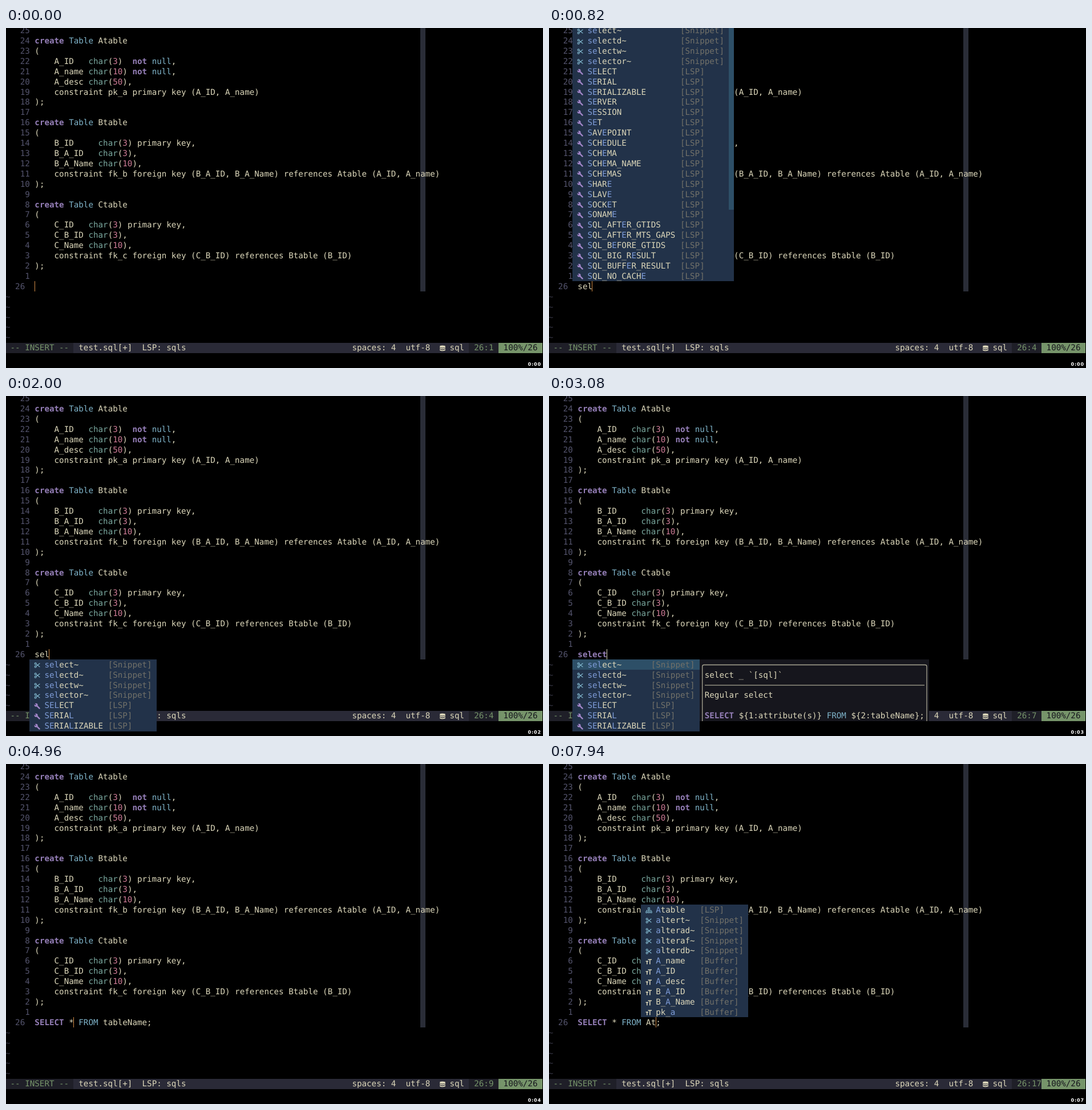
Recreate the animation shown at these times as an HTML page. Size 941 by 595 pixels, loop 8000 ms.

```html
<!DOCTYPE html>
<html lang="en">
<head>
<meta charset="utf-8">
<title>SQL completion in a terminal editor</title>
<style>
  html, body { margin: 0; width: 100%; height: 100%; overflow: hidden; background: #000; }
  #stage {
    position: relative; width: 941px; height: 595px; overflow: hidden;
    font: 14.21px/17.91px "DejaVu Sans Mono", "Liberation Mono", monospace;
    color: #dcd7ba; text-rendering: geometricPrecision; font-variant-ligatures: none;
  }
  #stage i, #stage svg { position: absolute; font-style: normal; white-space: pre; }
  .kw { color: #957fb8; font-weight: bold; }
  .sp { color: #7fb4ca; }
  .ty { color: #7aa89f; }
  .nu { color: #d27e99; }
  .ln { color: #54546d; }
  .tilde { color: #363646; }
  .hit { color: #7e9cd8; }
  .kind { color: #727169; }
  .ins { color: #76946a; }
  .vis { color: #957fb8; }
  .dark { color: #16161d; }
  .clock {
    right: 3px; top: 584px; color: #fff; letter-spacing: .9px;
    font: bold 8px/9px "DejaVu Sans", sans-serif;
  }
</style>
</head>
<body>
<div id="stage"><div id="base"></div><div id="live"></div></div>

<svg width="0" height="0" style="position:absolute">
  <symbol id="cut" viewBox="0 0 12 12">
    <g fill="none" stroke="#7fb4ca" stroke-width="1.2">
      <circle cx="2.7" cy="3.3" r="1.5"/><circle cx="2.7" cy="8.7" r="1.5"/>
      <path d="M4 4.2 10.4 9.2M4 7.8 10.4 2.8"/>
    </g>
  </symbol>
  <symbol id="tool" viewBox="0 0 12 12">
    <path d="M4.5 4.5 9.6 9.6" stroke="#a286c8" stroke-width="2.4" stroke-linecap="round"/>
    <circle cx="3.6" cy="3.8" r="3" fill="#a286c8"/>
    <path d="M.3 1.2 3.2 3.6" stroke="#223249" stroke-width="1.5"/>
  </symbol>
  <symbol id="tree" viewBox="0 0 12 12">
    <g fill="none" stroke="#7fb4ca">
      <path d="M4.5 1.5h3v2.5h-3zM.8 8h2.4v2.5H.8zM4.8 8h2.4v2.5H4.8zM8.8 8h2.4v2.5H8.8zM6 4v4M2 8V6h8v2"/>
    </g>
  </symbol>
  <symbol id="text" viewBox="0 0 12 12">
    <path d="M4.5 2.3H11M7.8 2.3V10.5M.6 5.3H5M2.8 5.3V10.5" fill="none" stroke="#dcd7ba" stroke-width="1.5"/>
  </symbol>
  <symbol id="db" viewBox="0 0 12 12">
    <g fill="#dcd7ba">
      <ellipse cx="6" cy="2.5" rx="5" ry="1.9"/>
      <path id="disc" d="M1 4q5 2.8 10 0v1.8q-5 2.8-10 0z"/>
      <use href="#disc" y="3.1"/>
    </g>
  </symbol>
</svg>

<script>
const CW = 8.555, RH = 17.91, X0 = -1, Y0 = 443.4, LOOP = 8000;
const DROP = 1.4; // text sits this much below the middle of its row
const MENU = '#223249', BAR = '#2d4f67', PANEL = '#2a2a37', RULER = '#2a2d37', EDGE = '#1f1f28';

// Row 0 is the line being typed; column 0 is the left edge of the terminal.
const x = col => X0 + col * CW;
const y = row => Y0 + row * RH;

const put = (col, row, text, cls = '') =>
  `<i class="${cls}" style="left:${x(col).toFixed(2)}px;top:${(y(row) + DROP).toFixed(2)}px">${text}</i>`;

const rect = (l, t, w, h, color) =>
  `<i style="left:${l}px;top:${t}px;width:${w}px;height:${h}px;background:${color}"></i>`;

function fill(c1, c2, r1, r2, color) {
  const l = Math.floor(x(c1)), t = Math.round(y(r1));
  return rect(l, t, Math.floor(x(c2)) - l, Math.round(y(r2)) - t, color);
}

const icon = (id, col, row) =>
  `<svg width="12" height="12" style="left:${x(col) - 1}px;top:${y(row) + 2.6 + DROP}px"><use href="#${id}"/></svg>`;

const RULES = [
  [/^(create|not|select)$/i, 'kw'], [/^(Table|null|FROM)$/, 'sp'],
  [/^char$/, 'ty'], [/^\d+$/, 'nu']
];

function sql(col, row, line) {
  let out = '';
  for (const m of line.matchAll(/(?<=\()\d+|\w+|[^\w\s]+/g)) {
    const rule = RULES.find(([re]) => re.test(m[0]));
    const cls = rule && !(rule[1] === 'nu' && line[m.index - 1] !== '(') ? rule[1] : '';
    out += put(col + m.index, row, m[0], cls);
  }
  return out;
}

const CODE = `
create Table Atable
(
    A_ID   char(3)  not null,
    A_name char(10) not null,
    A_desc char(50),
    constraint pk_a primary key (A_ID, A_name)
);

create Table Btable
(
    B_ID     char(3) primary key,
    B_A_ID   char(3),
    B_A_Name char(10),
    constraint fk_b foreign key (B_A_ID, B_A_Name) references Atable (A_ID, A_name)
);

create Table Ctable
(
    C_ID   char(3) primary key,
    C_B_ID char(3),
    C_Name char(10),
    constraint fk_c foreign key (C_B_ID) references Btable (B_ID)
);
`.split('\n');

function base() {
  let out = rect(726, 0, 9, Math.round(y(1)), RULER);
  CODE.forEach((line, i) => {
    const n = 25 - i;
    out += put(3, -n, String(n).padStart(2), 'ln') + sql(6, -n, line);
  });
  out += put(2, 0, '26', 'ln');
  for (let r = 1; r <= 5; r++) out += put(0, r, '~', 'tilde');
  out += fill(0, 14, 6, 7, EDGE) + fill(14, 95, 6, 7, PANEL) + fill(95, 101, 6, 7, EDGE);
  out += put(15, 6, 'test.sql[+]') + put(28, 6, 'LSP: sqls') + put(71, 6, 'spaces: 4');
  return out + put(82, 6, 'utf-8') + icon('db', 89, 6) + put(91, 6, 'sql');
}

const entries = (kind, glyph, names) => names.split(' ').map(name => ({ name, kind, glyph }));
const lsp = names => entries('[LSP]', 'tool', names);

const snippets = entries('[Snippet]', 'cut', 'select~ selectd~ selectw~ selector~');
const SCH = 'SAVEPOINT SCHEDULE SCHEMA SCHEMA_NAME SCHEMAS ';
const SE = 'SELECT SERIAL SERIALIZABLE SERVER SESSION SET ';
const SQL = 'SHARE SLAVE SOCKET SONAME SQL_AFTER_GTIDS SQL_AFTER_MTS_GAPS SQL_BEFORE_GTIDS SQL_BIG_RESULT SQL_BUFFER_RESULT ';

const menuS = { key: 's', col: 5, row: -25, bar: 14, items: [...snippets, ...lsp(SCH + SE + SQL + 'SQL_CALC_FOUND_ROWS')] };
const menuSe = { key: 'se', col: 5, row: -25, bar: 18, items: [...snippets, ...lsp(SE + SCH + SQL + 'SQL_NO_CACHE')] };
const menuSel = { key: 'sel', col: 5, row: 1, items: [...snippets, ...lsp('SELECT SERIAL SERIALIZABLE')] };
const menuA = {
  key: 'a', col: 19, row: -11, items: [
    ...entries('[LSP]', 'tree', 'Atable'),
    ...entries('[Snippet]', 'cut', 'altert~ alterad~ alteraf~ alterdb~'),
    ...entries('[Buffer]', 'text', 'A_name A_ID A_desc B_A_ID B_A_Name pk_a')
  ]
};

// Marks the typed letters in the order they occur in the name.
function mark(name, key) {
  let k = 0;
  return [...name].map(c =>
    c.toLowerCase() === key[k] ? (k++, `<span class="hit">${c}</span>`) : c).join('');
}

function menu({ key, col, row, bar, items }, picked) {
  const wide = Math.max(...items.map(e => e.name.length));
  const end = col + wide + 14, last = row + items.length;
  let out = fill(col, end + (bar ? 1 : 0), row, last, MENU);
  if (bar) out += fill(end, end + 1, row, row + bar, BAR);
  if (picked) out += fill(col, end, row, row + 1, BAR);
  items.forEach((e, i) => {
    const r = row + i;
    out += icon(e.glyph, col + 1, r) + put(col + 3, r, mark(e.name, key)) + put(col + wide + 4, r, e.kind, 'kind');
  });
  return out;
}

function docs() {
  return fill(31, 78, 1, 7, '#16161d') +
    `<svg width="402" height="108" style="left:264px;top:461px" fill="none" stroke="#a8a592" stroke-width="1.3">
      <path d="M4.7 108V12.5q0-3 3-3H395q3 0 3 3V108M9 45.2H394"/></svg>` +
    put(32, 2, 'select _ `[sql]`') + put(32, 4, 'Regular select') +
    sql(32, 6, 'SELECT ${1:attribute(s)} FROM ${2:tableName};');
}

const STEPS = [
  { at: 0, line: '', caret: 0 },
  { at: 230, line: 's', caret: 1, menu: menuS },
  { at: 350, line: 'se', caret: 2, menu: menuS },
  { at: 530, line: 'se', caret: 2, menu: menuSe },
  { at: 820, line: 'sel', caret: 3, menu: menuSe },
  { at: 910, line: 'sel', caret: 3, menu: menuSel },
  { at: 2300, line: 'select', caret: 6, menu: menuSel, picked: true },
  { at: 3550, line: 'SELECT attribute(s) FROM tableName;', caret: 7, span: 12 },
  { at: 4960, line: 'SELECT * FROM tableName;', caret: 8 },
  { at: 6000, line: 'SELECT * FROM tableName;', caret: 14, span: 9 },
  { at: 7490, line: 'SELECT * FROM A;', caret: 15, menu: menuA },
  { at: 7940, line: 'SELECT * FROM At;', caret: 16, menu: menuA }
];
const TICKS = [1010, 2000, 3080, 4030, 5080, 6000, 6990];

function view(s, seconds) {
  const at = 6 + s.caret, mode = s.span ? 'vis' : 'ins';
  let out = '';
  if (s.span) out += fill(at, at + s.span, 0, 1, MENU) + fill(at, at + 1, 0, 1, '#ffa95f');
  out += sql(6, 0, s.line);
  if (!s.span) out += rect(Math.floor(x(at)), 443, 1.4, 18, s.picked ? '#dcd7ba' : '#d08a45');
  out += put(1, 6, s.span ? '-- SELECT --' : '-- INSERT --', mode);
  out += fill(101, 110, 6, 7, s.span ? '#957fb8' : '#76946a');
  out += put(96, 6, `26:${s.caret + 1}`, mode) + put(102, 6, '100%/26', 'dark');
  if (s.span) out += put(99, 8, s.span);
  if (s.menu) out += menu(s.menu, s.picked);
  if (s.picked) out += docs();
  return out + `<i class="clock">0:0${seconds}</i>`;
}

document.getElementById('base').innerHTML = base();
const live = document.getElementById('live');
const start = performance.now();
let shown = '';

function draw() {
  const t = (performance.now() - start) % LOOP;
  const step = STEPS.filter(s => s.at <= t).length - 1;
  const seconds = TICKS.filter(v => v <= t).length;
  const id = step + ':' + seconds;
  if (id !== shown) {
    shown = id;
    live.innerHTML = view(STEPS[step], seconds);
  }
  requestAnimationFrame(draw);
}
draw();
</script>
</body>
</html>
```
